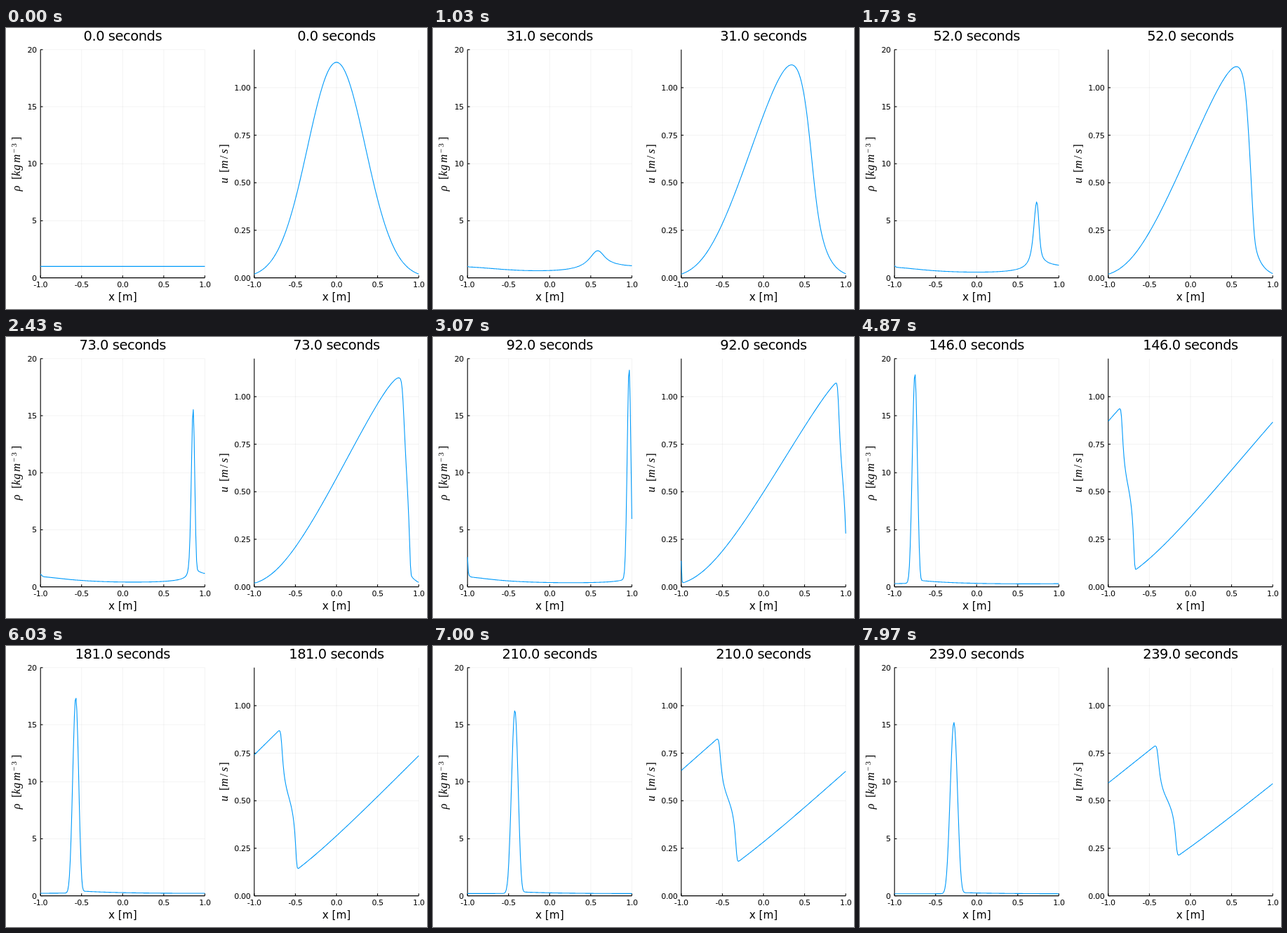
Write an HTML page that moves like this. It is 600 px wide and 400 px high and loops after 8.01 s.

```html
<!DOCTYPE html>
<html lang="en">
<head>
<meta charset="utf-8">
<title>Density and velocity</title>
<style>
  html, body { margin: 0; width: 100%; height: 100%; overflow: hidden; background: #fff; }
  svg { display: block; width: 600px; height: 400px; }
  text { font-family: "DejaVu Sans", Verdana, sans-serif; fill: #000; }
  .title { font-size: 19.44px; letter-spacing: -.45px; text-anchor: middle; }
  .tick { font-size: 11.11px; letter-spacing: -.45px; }
  .guide { font-size: 15.28px; text-anchor: middle; }
  .math { font: italic 16.5px "Liberation Serif", "Times New Roman", serif; }
  .math .up { font-style: normal; }
  .math .sup { font-size: 11px; font-style: normal; }
  .grid { stroke: #000; stroke-opacity: .1; stroke-width: .5; }
  .axis { stroke: #000; stroke-width: 1.1; }
  .curve { fill: none; stroke: #009afa; stroke-width: 1.1; stroke-linejoin: round; }
</style>
</head>
<body>
<svg id="stage" viewBox="0 0 600 400"></svg>
<script>
const LOOP = 8010, FRAMES = 240, POINTS = 200, DX = 2 / POINTS;
const STEPS = 10, DT = 0.01 / STEPS;
const TOP = 30.8, BOTTOM = 355.6;
const stage = document.getElementById('stage');
const xAt = i => -1 + 2 * i / (POINTS - 1);

function add(tag, attrs, text, parent = stage) {
  const el = document.createElementNS('http://www.w3.org/2000/svg', tag);
  for (const key in attrs) el.setAttribute(key, attrs[key]);
  if (text !== undefined) el.textContent = text;
  return parent.appendChild(el);
}

const line = (cls, x1, y1, x2, y2) => add('line', { class: cls, x1, y1, x2, y2 });

// One panel: grid, axes, labels; returns its moving parts.
function panel(left, right, max, ticks, digits) {
  const px = x => left + (x + 1) / 2 * (right - left);
  const py = y => BOTTOM - y / max * (BOTTOM - TOP);
  const xs = [-1, -0.5, 0, 0.5, 1];
  xs.slice(1).forEach(x => line('grid', px(x), TOP, px(x), BOTTOM));
  ticks.slice(1).forEach(y => line('grid', left, py(y), right, py(y)));
  line('axis', left, BOTTOM, right, BOTTOM);
  line('axis', left, TOP, left, BOTTOM);
  for (const x of xs) {
    line('axis', px(x), BOTTOM, px(x), BOTTOM - 3.3);
    add('text', { class: 'tick', x: px(x), y: 369.2, 'text-anchor': 'middle' }, x.toFixed(1));
  }
  for (const y of ticks) {
    line('axis', left, py(y), left + 3.3, py(y));
    add('text', { class: 'tick', x: left - 5.5, y: py(y) + 4, 'text-anchor': 'end' }, y.toFixed(digits));
  }
  const mid = (left + right) / 2;
  add('text', { class: 'guide', x: mid, y: 388 }, 'x [m]');
  return {
    title: add('text', { class: 'title', x: mid, y: 18 }),
    curve: add('polyline', { class: 'curve' }),
    trace: values => Array.from(values, (v, i) =>
      px(xAt(i)).toFixed(2) + ',' + py(Math.min(v, max)).toFixed(2)).join(' ')
  };
}

// Vertical formula: parts are [offset, text, class, raise].
function formula(x, y, parts) {
  const g = add('g', { transform: `translate(${x} ${y}) rotate(-90)` });
  for (const [dx, text, cls = '', dy = 0] of parts) {
    const t = add('text', { class: 'math', x: dx, y: dy }, undefined, g);
    add('tspan', { class: cls }, text, t);
  }
}

const rhoPanel = panel(49.2, 283.4, 20, [0, 5, 10, 15, 20], 0);
const uPanel = panel(353.8, 588.2, 1.2, [0, 0.25, 0.5, 0.75, 1], 2);
formula(20.2, 232.3, [[0, 'ρ'], [16.5, '[', 'up'], [21.5, 'k'], [29.5, 'g'],
  [40.5, 'm'], [54, '−', 'sup', -5.5], [62.5, '3', 'sup', -5.5], [72, ']', 'up']]);
formula(316, 221.3, [[0, 'u'], [15.5, '[', 'up'], [21, 'm'], [35, '/', 'up'],
  [42.5, 's'], [50.5, ']', 'up']]);

// Pressureless gas on a ring, first-order upwind in mass and momentum.
const SIGMA = 0.352;
let rho = new Float64Array(POINTS).fill(1);
let u = Float64Array.from(rho, (_, i) =>
  Math.exp(-(xAt(i) ** 2) / (2 * SIGMA * SIGMA)) / (SIGMA * Math.sqrt(2 * Math.PI)));

function step() {
  const k = DT / DX, r = new Float64Array(POINTS), v = new Float64Array(POINTS);
  for (let i = 0; i < POINTS; i++) {
    const j = (i || POINTS) - 1;
    const out = k * rho[i] * u[i], into = k * rho[j] * u[j];
    r[i] = rho[i] - out + into;
    v[i] = (rho[i] * u[i] - out * u[i] + into * u[j]) / r[i];
  }
  rho = r;
  u = v;
}

const frames = [];
for (let n = 0; n < FRAMES; n++) {
  frames.push([rhoPanel.trace(rho), uPanel.trace(u)]);
  for (let s = 0; s < STEPS; s++) step();
}

const startOf = n => Math.round(n * 10 / 3) * 10;
let shown = -1;

function show(n) {
  if (n === shown) return;
  shown = n;
  [rhoPanel, uPanel].forEach((p, i) => {
    p.title.textContent = n.toFixed(1) + ' seconds';
    p.curve.setAttribute('points', frames[n][i]);
  });
}

const origin = performance.now();
function tick() {
  const t = (performance.now() - origin) % LOOP;
  let n = Math.min(FRAMES - 1, Math.floor(t * 0.03) + 1);
  while (startOf(n) > t) n--;
  show(n);
  requestAnimationFrame(tick);
}
tick();
</script>
</body>
</html>
```
